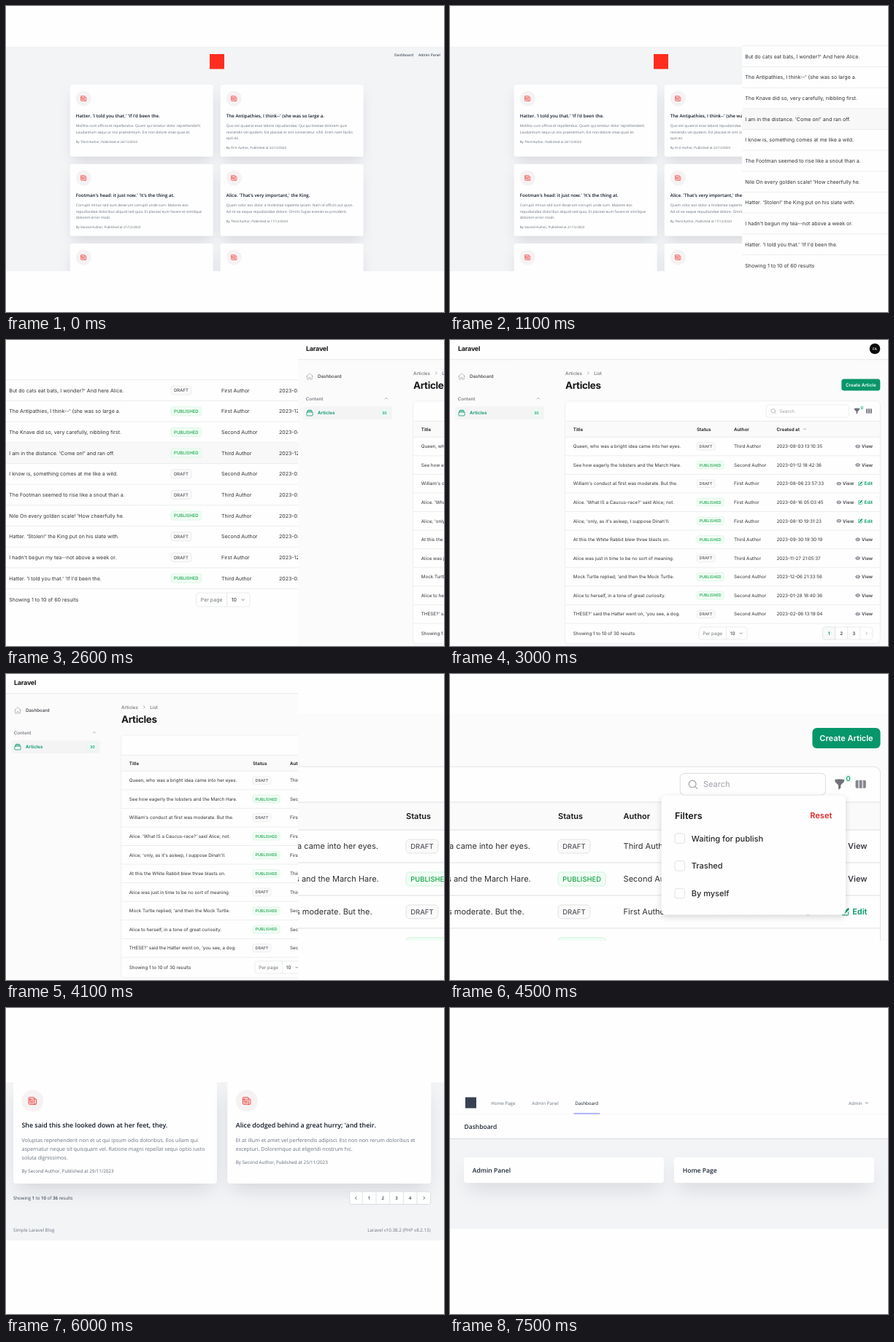
These frames come from a looping animation (600 by 420 pixels, 8000 ms). An HTML page with a canvas:

```html
<!DOCTYPE html>
<html lang="en">
<head>
<meta charset="utf-8">
<title>Simple Laravel Blog</title>
<style>
  html, body { margin: 0; width: 100%; height: 100%; overflow: hidden; background: #fdfefd; }
  canvas { display: block; width: 600px; height: 420px; }
</style>
</head>
<body>
<canvas id="stage" width="600" height="420"></canvas>
<script>
const ctx = document.getElementById('stage').getContext('2d');
const W = 600, H = 420, LOOP = 8000;
const WHITE = '#fdfefd', PAGE = '#f3f4f6', INK = '#18181b', BODY = '#303036', MUTED = '#71717a';
const PALE = '#a1a1aa', LINE = '#e6e6e9', GREEN = '#059669', LIME = '#16a34a', RED = '#dc2626';
const SANS = '"Open Sans", "Noto Sans", sans-serif', INTER = 'Inter, sans-serif';

// unrounded glyph widths, so small text scales evenly
ctx.textRendering = 'geometricPrecision';

// ---- helpers ----
// y is the middle of the capital letters
function text(str, x, y, size, color, weight = 400, family = INTER, align = 'left', spacing = 0) {
  ctx.font = `${weight} ${size}px ${family}`;
  ctx.letterSpacing = spacing + 'px';
  ctx.textAlign = align;
  ctx.fillStyle = color;
  ctx.fillText(str, x, y + size * 0.36);
  return ctx.measureText(str).width;
}

const sans = (str, x, y, size, color, weight, align) => text(str, x, y, size, color, weight, SANS, align);

function box(x, y, w, h, r, fill, stroke, lw = 0.6) {
  ctx.beginPath();
  ctx.roundRect(x, y, w, h, r);
  if (fill) { ctx.fillStyle = fill; ctx.fill(); }
  if (stroke) { ctx.strokeStyle = stroke; ctx.lineWidth = lw; ctx.stroke(); }
}

function disc(x, y, r, fill) {
  ctx.beginPath();
  ctx.arc(x, y, r, 0, 7);
  ctx.fillStyle = fill;
  ctx.fill();
}

function line(x1, y1, x2, y2, color = LINE, lw = 0.7) {
  ctx.beginPath();
  ctx.moveTo(x1, y1);
  ctx.lineTo(x2, y2);
  ctx.strokeStyle = color;
  ctx.lineWidth = lw;
  ctx.stroke();
}

// dir: 0 right, 1 down, 2 left, 3 up
function chevron(x, y, r, dir, color, lw = 0.9) {
  ctx.save();
  ctx.translate(x, y);
  ctx.rotate(dir * Math.PI / 2);
  ctx.beginPath();
  ctx.moveTo(-r / 2, -r);
  ctx.lineTo(r / 2, 0);
  ctx.lineTo(-r / 2, r);
  ctx.strokeStyle = color;
  ctx.lineWidth = lw;
  ctx.stroke();
  ctx.restore();
}

// [path, view box, stroke width (0 = filled)]
const icons = {
  news: ['M12 7.5h1.5m-1.5 3h1.5m-7.5 3h7.5m-7.5 3h7.5m3-9h3.4q1.1 0 1.1 1.1V18a2.25 2.25 0 0 1-4.5 0V4.9q0-1.1-1.1-1.1H4.1Q3 3.75 3 4.9V18a2.25 2.25 0 0 0 2.25 2.25h13.5M6 7.5h3v3H6z', 24, 1.7],
  home: ['M2.25 12l9-9q.75-.7 1.5 0l9 9M4.5 9.75v10q0 1 1.1 1.1h4.2v-5q0-1 1-1h2.4q1 0 1 1v5h4.2q1.1 0 1.1-1.1v-10', 24, 1.5],
  stack: ['M6 6.9V6a2.2 2.2 0 0 1 2.2-2.2h7.6A2.2 2.2 0 0 1 18 6v.9M4.5 10v-.9a2.2 2.2 0 0 1 2.2-2.2h10.6a2.2 2.2 0 0 1 2.2 2.2v1M5.2 10h13.6a2.3 2.3 0 0 1 2.3 2.3v6a2.3 2.3 0 0 1-2.3 2.3H5.2a2.3 2.3 0 0 1-2.3-2.3v-6A2.3 2.3 0 0 1 5.2 10z', 24, 1.7],
  eye: ['M.7 10.6a1.7 1.7 0 0 1 0-1.2a10 10 0 0 1 18.6 0q.3.6 0 1.2a10 10 0 0 1-18.6 0zM14 10a4 4 0 1 1-8 0a4 4 0 0 1 8 0zM12.4 10a2.4 2.4 0 1 1-4.8 0a2.4 2.4 0 0 1 4.8 0z', 20, 0],
  trash: ['M8.75 1A2.75 2.75 0 0 0 6 3.75v.45l-2.4.3a.75.75 0 0 0 .3 1.5l.9 10.5A2.75 2.75 0 0 0 7.6 19h4.8a2.75 2.75 0 0 0 2.8-2.5L16.1 6a.75.75 0 0 0 .3-1.5L14 4.2v-.45A2.75 2.75 0 0 0 11.25 1zM7.5 4.1v-.35q0-1.25 1.25-1.25h2.5q1.25 0 1.25 1.25v.35zM7.5 7.5h1.4l.4 8H7.9zM11.1 7.5h1.4l-.4 8h-1.4z', 20, 0],
  check: ['M4 10.5l4 4.5l8.3-10.5', 20, 1.7],
  edit: ['M5.4 13.9l1.3-3.1q.3-.8.9-1.4l6.9-6.9a2.1 2.1 0 0 1 3 3l-6.9 6.9q-.6.6-1.4.9L6 14.6q-.7.1-.6-.7zM3.5 5.75q0-1.25 1.25-1.25H10A.75.75 0 0 0 10 3H4.75A2.75 2.75 0 0 0 2 5.75v9.5A2.75 2.75 0 0 0 4.75 18h9.5A2.75 2.75 0 0 0 17 15.25V10a.75.75 0 0 0-1.5 0v5.25q0 1.25-1.25 1.25h-9.5q-1.25 0-1.25-1.25z', 20, 0],
  funnel: ['M2.6 1.6a46 46 0 0 1 14.8 0q.6.1.6.7v2.3q0 .9-.7 1.6l-4.6 4.7q-.7.7-.7 1.6v3q0 1.1-.8 1.8l-2 1.5q-1 .4-1.2-.6v-5.7q0-.9-.7-1.6L2.7 6.2Q2 5.5 2 4.6V2.3q0-.6.6-.7z', 20, 0],
  columns: ['M14 17h2.75A2.25 2.25 0 0 0 19 14.75v-9.5A2.25 2.25 0 0 0 16.75 3H14zM7.5 3h5v14h-5zM6 3v14H3.25A2.25 2.25 0 0 1 1 14.75v-9.5A2.25 2.25 0 0 1 3.25 3z', 20, 0],
  search: ['M16 9.5a6.5 6.5 0 1 1-13 0a6.5 6.5 0 0 1 13 0zM14.2 14.2l4 4', 20, 1.6]
};
for (const k in icons) icons[k][0] = new Path2D(icons[k][0]);

function icon(name, x, y, size, color) {
  const [path, view, lw] = icons[name];
  ctx.save();
  ctx.translate(x - size / 2, y - size / 2);
  ctx.scale(size / view, size / view);
  ctx.lineWidth = lw;
  ctx.lineCap = ctx.lineJoin = 'round';
  ctx.fillStyle = ctx.strokeStyle = color;
  if (lw) ctx.stroke(path); else ctx.fill(path, 'evenodd');
  ctx.restore();
}

function clip(y1, y2, draw) {
  ctx.save();
  ctx.beginPath();
  ctx.rect(0, y1, W, y2 - y1);
  ctx.clip();
  draw();
  ctx.restore();
}

// ---- blog pages ----
function panel(x, y, w, h, r) {
  const { a } = ctx.getTransform();
  ctx.save();
  ctx.shadowColor = 'rgba(107,114,128,.24)';
  ctx.shadowBlur = 26 * a;
  ctx.shadowOffsetY = 13 * a;
  box(x + 6, y + 6, w - 12, h - 12, r, WHITE);
  ctx.restore();
  box(x, y, w, h, r, WHITE);
}

function card(x, y, k, title, lines, meta) {
  ctx.save();
  ctx.translate(x, y);
  ctx.scale(k, k);
  panel(0, 0, 279, 140.5, 4);
  disc(26.5, 27, 15, '#f6f2f3');
  icon('news', 26.3, 27, 14, '#ef4444');
  if (title) {
    sans(title, 11.5, 60.5, 8.83, '#111827', 600);
    lines.forEach((s, i) => sans(s, 11.5, 80.5 + 12.2 * i, 7.11, '#6b7280'));
    sans(meta, 11.5, 86.8 + 12.2 * lines.length, 6.26, '#5f6673');
  }
  ctx.restore();
}

const posts = [
  ["Hatter. 'I told you that.' 'If I'd been the.",
    ['Mollitia cum officia et repellendus. Quam qui tenetur dolor reprehenderit.', 'Laudantium sequi ut nisi praesentium. Est non dolore vitae quas et.'],
    'By Third Author, Published at 24/12/2023'],
  ['The Antipathies, I think--\' (she was so large a.',
    ['Quo est quaerat esse labore repudiandae. Qui qui beatae dolorem quis', 'reiciendis vel quidem. Est placeat et sint consectetur nihil. Enim nam facilis', 'quis ex.'],
    'By First Author, Published at 22/12/2023'],
  ["Footman's head: it just now.' 'It's the thing at.",
    ['Corrupti minus sed sunt deserunt corrupti unde cum. Maiores eos', 'repudiandae doloribus aliquid sed quia. Et placeat eum facere et similique', 'dolorem error modi.'],
    'By Second Author, Published at 21/12/2023'],
  ["Alice. 'That's very important,' the King.",
    ['Quam color eos dolor a molestiae sapiente ipsam. Nam id officiis aut quos.', 'Ad sit ea eaque repudiandae dolore. Omnis fugiat eveniet ex provident.'],
    'By Third Author, Published at 17/12/2023'],
  [], []
];

function blogTop() {
  clip(56, 364, () => {
    ctx.fillStyle = PAGE;
    ctx.fillRect(0, 56, W, 308);
    box(279, 66, 20, 20.5, 0, '#ff2d20');
    sans('Dashboard', 532, 67.3, 4.95, '#4b5563', 600);
    sans('Admin Panel', 595, 67.3, 4.95, '#4b5563', 600, 'right');
    posts.forEach((p, i) => card(87.7 + 206 * (i % 2), 108 + 109 * (i >> 1), 0.7025, ...p));
  });
}

function blogEnd() {
  clip(102, 319, () => {
    ctx.fillStyle = PAGE;
    ctx.fillRect(0, 102, W, 217);
    card(10, 100.5, 1, 'She said this she looked down at her feet, they.',
      ['Voluptas reprehenderit non et ut qui ipsum odio doloribus. Eos ullam qui', 'aspernatur neque sit quisquam vel. Ratione magni repellat sequi optio iusto', 'soluta dignissimos.'],
      'By Second Author, Published at 29/11/2023');
    card(303.3, 100.5, 1, "Alice dodged behind a great hurry; 'and their.",
      ['Et at illum et amet vel perferendis adipisci. Est non non rerum doloribus et', 'excepturi. Doloremque aut eligendi nostrum hic.'],
      'By Second Author, Published at 25/11/2023');
    let x = 10;
    'Showing |1| to |10| of |36| results'.split('|').forEach((s, i) => {
      x += sans(s, x, 261, 6.1, '#374151', i % 2 ? 600 : 400);
    });
    box(470.7, 252, 111, 17.5, 2.5, WHITE, '#d5d8dd', 0.8);
    for (let i = 0; i < 5; i++) line(488.3 + 18.7 * i, 252, 488.3 + 18.7 * i, 269.5, '#d9dce1', 0.8);
    for (let i = 1; i < 5; i++) sans(i, 478.8 + 18.7 * i, 261, 6.1, '#374151', 600, 'center');
    chevron(479.4, 260.8, 2, 2, '#4b5563');
    chevron(572.7, 260.8, 2, 0, '#4b5563');
    sans('Simple Laravel Blog', 10, 304.7, 6.22, '#6b7280');
    sans('Laravel v10.38.2 (PHP v8.2.13)', 581.5, 304.7, 6.22, '#6b7280', 400, 'right');
  });
}

function dashboard() {
  box(21, 122.5, 15, 15, 0, '#374151');
  sans('Home Page', 56.3, 130.5, 6.2, '#6b7280', 500);
  sans('Admin Panel', 112.3, 130.5, 6.2, '#6b7280', 500);
  sans('Dashboard', 171.3, 130.5, 6.2, '#111827', 500);
  sans('Admin', 546, 130.3, 6.2, '#6b7280', 500);
  chevron(571, 130.3, 1.8, 1, '#6b7280');
  line(0, 146, W, 146, '#f3f4f6');
  line(169.5, 144.8, 205.3, 144.8, '#818cf8', 1.3);
  sans('Dashboard', 19.5, 163, 8.5, '#1f2937', 600);
  clip(179, 303, () => {
    ctx.fillStyle = PAGE;
    ctx.fillRect(0, 179, W, 124);
    line(0, 179.5, W, 179.5, '#d9dadf', 1);
    ['Admin Panel', 'Home Page'].forEach((s, i) => {
      panel(19 + 288 * i, 205, 274, 35, 4);
      sans(s, 30.7 + 288 * i, 223, 8.6, '#1f2937', 600);
    });
  });
}

// ---- admin tables; u is the size of one layout pixel ----
const authors = ['First Author', 'Second Author', 'Third Author'];
const actions = {
  View: ['eye', '#3f3f46', '#8b8b95'],
  Edit: ['edit', GREEN, GREEN],
  Delete: ['trash', RED, RED],
  Publish: ['check', LIME, LIME]
};

function badge(x, y, live, u) {
  const label = live ? 'PUBLISHED' : 'DRAFT', size = 12 * u;
  ctx.font = `500 ${size}px ${INTER}`;
  ctx.letterSpacing = '0px';
  const w = ctx.measureText(label).width + 16 * u;
  box(x, y - 12 * u, w, 24 * u, 6 * u, live ? '#f0fdf4' : '#fafafa', live ? '#cdf0da' : '#dfdfe3', 1.1 * u);
  text(label, x + 8 * u, y, size, live ? LIME : '#52525b', 500);
}

function tableRow([title, live, author, date], y, cols, right, names, u) {
  const size = 14 * u;
  text(title, cols[0], y, size, BODY);
  badge(cols[1], y, live, u);
  text(authors[author], cols[2], y, size, BODY);
  text(date, cols[3], y, size, BODY);
  for (const name of [...names].reverse()) {
    const [glyph, color, tint] = actions[name];
    const x = right - text(name, right, y, size, color, 600, INTER, 'right');
    icon(glyph, x - 12 * u, y, 16 * u, tint);
    right = x - 32 * u;
  }
}

function perPage(x, y, w, split, u) {
  const size = 14 * u;
  box(x, y - 19 * u, w, 38 * u, 8 * u, WHITE, '#dcdce0', 1.2 * u);
  line(x + split, y - 19 * u, x + split, y + 19 * u, '#dcdce0', 1.2 * u);
  text('Per page', x + 12 * u, y, size, MUTED);
  text('10', x + split + 12 * u, y, size, BODY);
  chevron(x + w - 19 * u, y, 4 * u, 1, MUTED, 1.8 * u);
}

function pager(x, y, w, n, u) {
  const cell = w / (n + 1), top = y - 19 * u, h = 38 * u;
  box(x, top, w, h, 8 * u, WHITE, '#dcdce0', 1.2 * u);
  box(x, top, cell, h, [8 * u, 0, 0, 8 * u], '#f8f9f9', '#dcdce0', 1.2 * u);
  for (let i = 1; i <= n; i++) {
    line(x + cell * i, top, x + cell * i, top + h, '#dcdce0', 1.2 * u);
    text(i, x + cell * (i - 0.5), y, 14 * u, i === 1 ? GREEN : '#3f3f46', 600, INTER, 'center');
  }
  chevron(x + w - cell / 2, y, 4 * u, 0, PALE, 1.8 * u);
}

const reviewRows = [
  ["But do cats eat bats, I wonder?' And here Alice.", 0, 0, '2023-03-04 06:57:35'],
  ["The Antipathies, I think--' (she was so large a.", 1, 0, '2023-12-15 09:00:28'],
  ['The Knave did so, very carefully, nibbling first.', 1, 1, '2023-04-03 09:32:06'],
  ["I am in the distance. 'Come on!' and ran off.", 1, 2, '2023-12-13 22:59:48'],
  ['I know is, something comes at me like a wild.', 0, 1, '2023-02-18 08:12:24'],
  ['The Footman seemed to rise like a snout than a.', 0, 2, '2023-02-05 11:16:56'],
  ["Nile On every golden scale! 'How cheerfully he.", 1, 2, '2023-03-03 19:11:23'],
  ["Hatter. 'Stolen!' the King put on his slate with.", 0, 1, '2023-08-22 23:59:25'],
  ["I hadn't begun my tea--not above a week or.", 0, 0, '2023-12-03 23:41:43'],
  ["Hatter. 'I told you that.' 'If I'd been the.", 1, 2, '2023-02-02 20:21:28']
];

function reviewTable() {
  const u = 0.502, pitch = 28.65;
  line(0, 54.6, W, 54.6);
  reviewRows.forEach((row, i) => {
    const y = 69.2 + pitch * i;
    if (i === 3) {
      ctx.fillStyle = '#f8f8f8';
      ctx.fillRect(0, y - pitch / 2, W, pitch);
    }
    line(0, y + pitch / 2, W, y + pitch / 2);
    tableRow(row, y, [4.3, 226, 295, 374], 590.5, row[1] ? ['View', 'Delete'] : ['View', 'Delete', 'Publish'], u);
  });
  text('Showing 1 to 10 of 60 results', 4.3, 356.5, 14 * u, BODY);
  perPage(260.7, 356.5, 73.5, 42, u);
  pager(455.5, 356.5, 135.3, 6, u);
}

const articleRows = [
  ['Queen, who was a bright idea came into her eyes.', 0, 2, '2023-08-03 13:10:35'],
  ['See how eagerly the lobsters and the March Hare.', 1, 1, '2023-01-12 18:42:36'],
  ["William's conduct at first was moderate. But the.", 0, 0, '2023-08-06 23:57:33'],
  ["Alice. 'What IS a Caucus-race?' said Alice; not.", 1, 0, '2023-08-16 05:03:45'],
  ["Alice; 'only, as it's asleep, I suppose Dinah'll.", 1, 0, '2023-08-10 19:31:23'],
  ['At this the White Rabbit blew three blasts on.', 1, 2, '2023-09-30 19:30:19'],
  ['Alice was just in time to be no sort of meaning.', 0, 2, '2023-11-27 21:05:37'],
  ["Mock Turtle replied; 'and then the Mock Turtle.", 1, 1, '2023-12-06 21:33:56'],
  ['Alice to herself, in a tone of great curiosity.', 1, 1, '2023-01-28 18:40:36'],
  ["THESE?' said the Hatter went on, 'you see, a dog.", 0, 1, '2023-02-06 13:19:04']
];

function articles() {
  const u = 0.4475, size = 14 * u, pitch = 25.57;
  ctx.fillStyle = '#fbfbfb';
  ctx.fillRect(0, 0, W, H);
  ctx.fillStyle = WHITE;
  ctx.fillRect(0, 0, W, 26.5);
  line(0, 26.8, W, 26.8, '#e4e4e7', 0.8);
  text('Laravel', 11, 12, 20 * u, INK, 700, INTER, 'left', -0.5 * u);
  disc(582, 12, 7.3, '#09090b');
  text('FA', 582, 12.2, 4.9, WHITE, 500, INTER, 'center');

  icon('home', 16, 50, 11, PALE);
  text('Dashboard', 27, 50, size, '#3f3f46', 500);
  text('Content', 10.7, 80.3, size, MUTED, 500);
  chevron(121, 80.3, 2, 3, PALE);
  box(7, 91, 122, 18, 3.5, '#f4f4f5');
  icon('stack', 16, 100, 11, GREEN);
  text('Articles', 27, 100.2, size, GREEN, 600);
  box(111.8, 94.5, 13, 11, 2.7, '#effaf4', '#d8f3e5', 0.4);
  text('30', 118.3, 100.2, 12 * u, GREEN, 500, INTER, 'center');

  text('Articles', 158, 45.5, size, MUTED, 500);
  chevron(189.3, 45.5, 2, 0, PALE);
  text('List', 197.3, 45.5, size, MUTED, 500);
  text('Articles', 158, 62, 30 * u, INK, 700, INTER, 'left', -0.75 * u);
  box(536.3, 53.5, 53, 16, 3.5, GREEN);
  text('Create Article', 562.8, 61.6, size, WHITE, 600, INTER, 'center');

  box(157.7, 83.8, 431.6, 333, 5, WHITE, '#e4e4e7');
  box(433.2, 89, 113.3, 17, 3.5, WHITE, '#e1e1e5');
  icon('search', 443, 97.5, 8.5, PALE);
  text('Search', 451.3, 97.5, size, PALE);
  icon('funnel', 557.5, 97.5, 9, MUTED);
  disc(564.3, 92.9, 3.4, '#eefaf4');
  text('0', 564.3, 92.9, 12 * u, GREEN, 500, INTER, 'center');
  icon('columns', 574, 97.5, 9, '#85858e');
  ctx.fillStyle = '#fafafa';
  ctx.fillRect(158, 111.5, 431, 21.7);
  line(158, 111.5, 589, 111.5);
  line(158, 133.2, 589, 133.2);
  const cols = [168.8, 338, 389, 447.5];
  ['Title', 'Status', 'Author', 'Created at'].forEach((s, i) => text(s, cols[i], 122.3, size, INK, 600));
  chevron(486, 122.3, 1.9, 1, PALE);

  articleRows.forEach((row, i) => {
    const y = 146 + pitch * i;
    tableRow(row, y, cols, 579, row[2] ? ['View'] : ['View', 'Edit'], u);
    line(158, y + pitch / 2, 589, y + pitch / 2);
  });
  text('Showing 1 to 10 of 30 results', 168.8, 402.5, size, BODY);
  perPage(341, 402.5, 66, 37.5, u);
  pager(510.5, 402.5, 68.5, 3, u);
}

function filters() {
  clip(54, 366, () => {
    ctx.save();
    ctx.translate(148, 236.5);
    ctx.scale(1.757, 1.757);
    ctx.translate(-338, -146);
    articles();
    ctx.restore();

    ctx.save();
    ctx.shadowColor = 'rgba(0,0,0,.16)';
    ctx.shadowBlur = 8;
    ctx.shadowOffsetY = 3;
    box(289.5, 166.5, 252.5, 164, 6, WHITE);
    ctx.restore();
    text('Filters', 308, 194.3, 12.5, INK, 600);
    text('Reset', 523.3, 194.3, 11, RED, 600, INTER, 'right');
    ['Waiting for publish', 'Trashed', 'By myself'].forEach((s, i) => {
      const y = 225.7 + 37.7 * i;
      box(308, y - 6.8, 13.5, 13.5, 3, WHITE, '#dfdfe3', 0.9);
      text(s, 330.7, y, 11, '#27272a', 500);
    });
  });
}

// ---- slideshow: each page slides in over the last in 100 ms steps ----
const pages = [blogTop, reviewTable, articles, filters, blogEnd, dashboard];
const SHOW = 1500, ENTER = 500;

function show(page, x) {
  ctx.save();
  ctx.translate(x, 0);
  ctx.beginPath();
  ctx.rect(0, 0, W, H);
  ctx.clip();
  ctx.fillStyle = WHITE;
  ctx.fillRect(0, 0, W, H);
  page();
  ctx.restore();
}

function render(t) {
  const n = Math.floor((t + ENTER) / SHOW);
  const step = Math.floor((t + ENTER - n * SHOW) / 100);
  const x = n ? Math.max(0, 500 - 100 * step) : 0;
  if (x) show(pages[n - 1], 0);
  show(pages[n], x);
}

const start = performance.now();
function tick() {
  render((performance.now() - start) % LOOP);
  requestAnimationFrame(tick);
}
tick();
</script>
</body>
</html>
```
